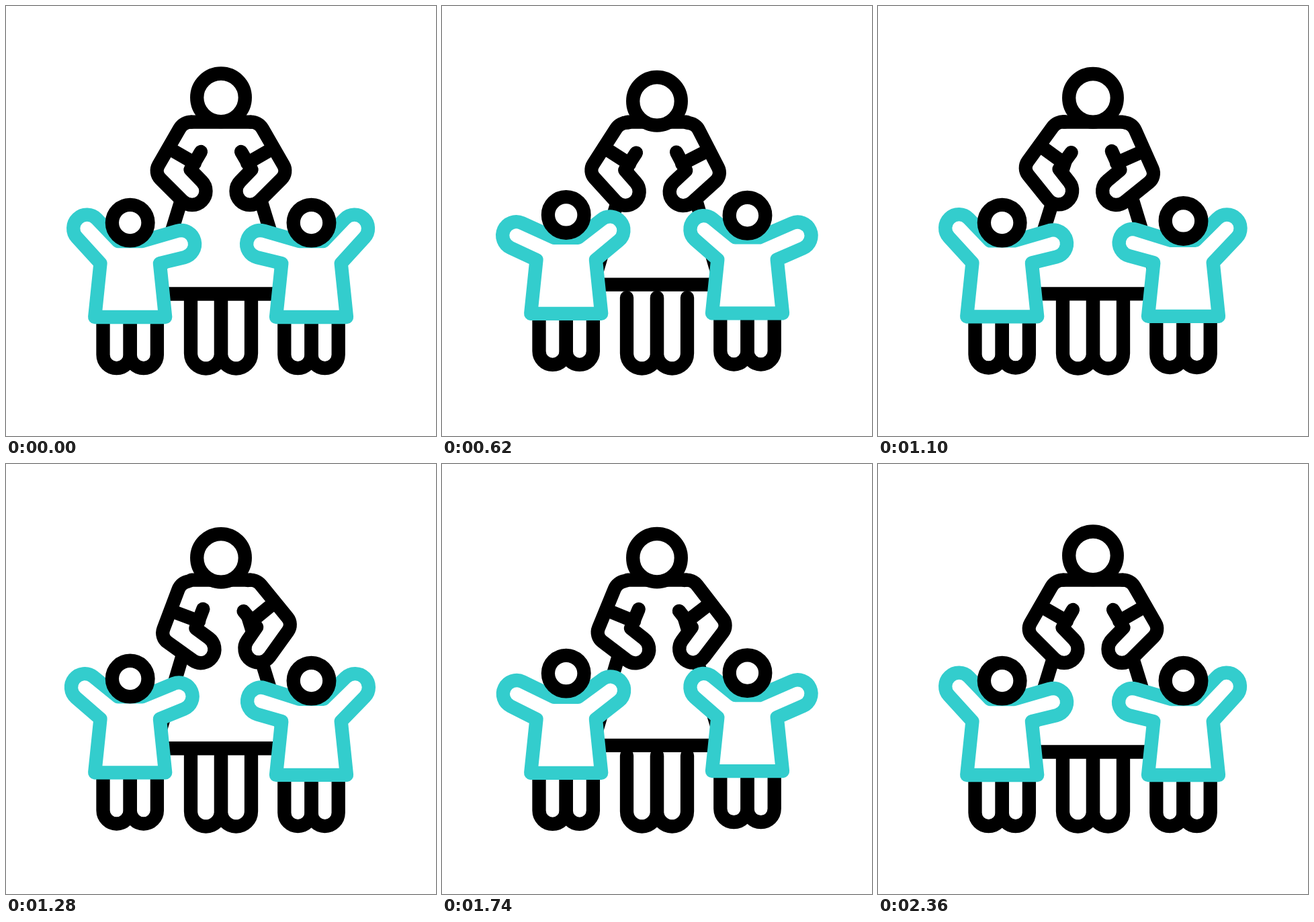
An HTML page with a canvas for the animation above (3600 ms loop, 640 by 640 pixels).

```html
<!DOCTYPE html>
<html lang="en">
<head>
<meta charset="utf-8">
<title>Teacher with children</title>
<style>
  html, body { margin: 0; width: 100%; height: 100%; overflow: hidden; background: #fff; }
  canvas { display: block; width: 100vmin; height: 100vmin; }
</style>
</head>
<body>
<canvas id="stage" width="640" height="640"></canvas>
<script>
const ctx = document.getElementById('stage').getContext('2d');
const LOOP = 3600, BLACK = '#000', TEAL = '#33cdcd';
const PI = Math.PI;

const mix = (a, b, k) => a.map((v, i) => v + (b[i] - v) * k);

// Eased step from 0 to 1 between two times.
function ease(t, from, to) {
  const k = Math.min(1, Math.max(0, (t - from) / (to - from)));
  return (1 - Math.cos(PI * k)) / 2;
}

// Two smooth humps, 0 to 1 and back, after a delay.
function wave(t, delay, period) {
  const k = Math.min(2, Math.max(0, (t - delay) / period));
  return (1 - Math.cos(2 * PI * k)) / 2;
}

// Arms swing one way, back and again, then settle; in degrees.
function swing(t) {
  return 16.5 * (ease(t, 0, 300) - 2 * ease(t, 300, 880)
    + 2 * ease(t, 880, 1460) - ease(t, 1460, 2000));
}

function line(...pts) {
  ctx.beginPath();
  pts.forEach(p => ctx.lineTo(...p));
  ctx.stroke();
}

function paint() {
  ctx.fill();
  ctx.stroke();
}

function head(x, y, r) {
  ctx.beginPath();
  ctx.arc(x, y, r, 0, 2 * PI);
  paint();
}

// Two U shapes side by side around x.
function legs(x, w, top, y) {
  for (const c of [x - w / 2, x + w / 2]) {
    ctx.beginPath();
    ctx.moveTo(c - w / 2, top);
    ctx.arc(c, y, w / 2, PI, 0, true);
    ctx.lineTo(c + w / 2, top);
    ctx.stroke();
  }
}

function adultArm(dir, deg, drop) {
  ctx.save();
  ctx.translate(320 + deg * 0.08, drop);
  ctx.scale(dir, 1);
  ctx.translate(-40, 200.5);
  ctx.rotate(-dir * deg * PI / 180);
  ctx.translate(-280, -200.5);
  ctx.beginPath();
  ctx.moveTo(276, 172.6);
  ctx.arcTo(264, 172.6, 220.5, 248, 20);
  ctx.arcTo(220.5, 248, 262.5, 290, 17);
  ctx.arc(277, 275.5, 20.5, PI * 0.75, -PI / 4, true);
  ctx.lineTo(274.5, 243.5);
  ctx.lineTo(290, 217);
  paint();
  line([242, 211.5], [281, 234]);
  ctx.restore();
}

function adult(t) {
  const deg = swing(t), nod = 6.2 * wave(t, 20, 990), lift = 14 * wave(t, 120, 960);
  const y = 428.5 - lift, half = 102 - lift * 0.5, x = 320 + deg * 0.1;
  ctx.strokeStyle = BLACK;
  legs(320, 45, 434, 517);
  line([281.5, 222], [x - half, y], [x + half, y], [358.5, 222]);
  adultArm(1, deg, nod * 0.2);
  adultArm(-1, deg, nod * 0.2);
  line([276, 172.6], [364, 172.6]);
  head(320, 136.3 + nod, 35.8);
}

// Rounded hand with straight sides running to points p and q.
function hand([x, y], p, q) {
  const r = 20.3;
  const touch = (pt, side) => {
    const dx = pt[0] - x, dy = pt[1] - y;
    return Math.atan2(dy, dx) + side * Math.acos(r / Math.hypot(dx, dy));
  };
  ctx.lineTo(...p);
  ctx.arc(x, y, r, touch(p, -1), touch(q, 1), true);
  ctx.lineTo(...q);
}

function child(x, dir, body, nod, arms) {
  ctx.save();
  ctx.translate(x, 0);
  ctx.scale(dir, 1);
  ctx.save();
  ctx.translate(0, -6 * body);
  ctx.strokeStyle = BLACK;
  legs(0, 40.2, 463, 519);
  ctx.strokeStyle = TEAL;
  ctx.beginPath();
  hand(mix([-64.2, 331], [-74.8, 347.5], arms), [-18, 350], [-44.2, 383]);
  ctx.lineTo(-52.5, 463);
  ctx.lineTo(52.5, 463);
  hand(mix([76.1, 354.3], [64.8, 338], arms), [44.2, 383], [18, 350]);
  ctx.closePath();
  paint();
  ctx.restore();
  ctx.strokeStyle = BLACK;
  head(0, 322.6 - 12 * nod, 26.8);
  ctx.restore();
}

function draw(t) {
  ctx.fillStyle = '#fff';
  ctx.fillRect(0, 0, 640, 640);
  ctx.lineWidth = 20.3;
  ctx.lineCap = ctx.lineJoin = 'round';
  adult(t);
  child(184.7, 1, wave(t, 0, 1000), wave(t, 20, 1080), wave(t, 0, 1080));
  child(454.5, -1, wave(t, 170, 1080), wave(t, 190, 1080), wave(t, 100, 1080));
}

const start = performance.now();
function tick() {
  draw((performance.now() - start) % LOOP);
  requestAnimationFrame(tick);
}
tick();
</script>
</body>
</html>
```
